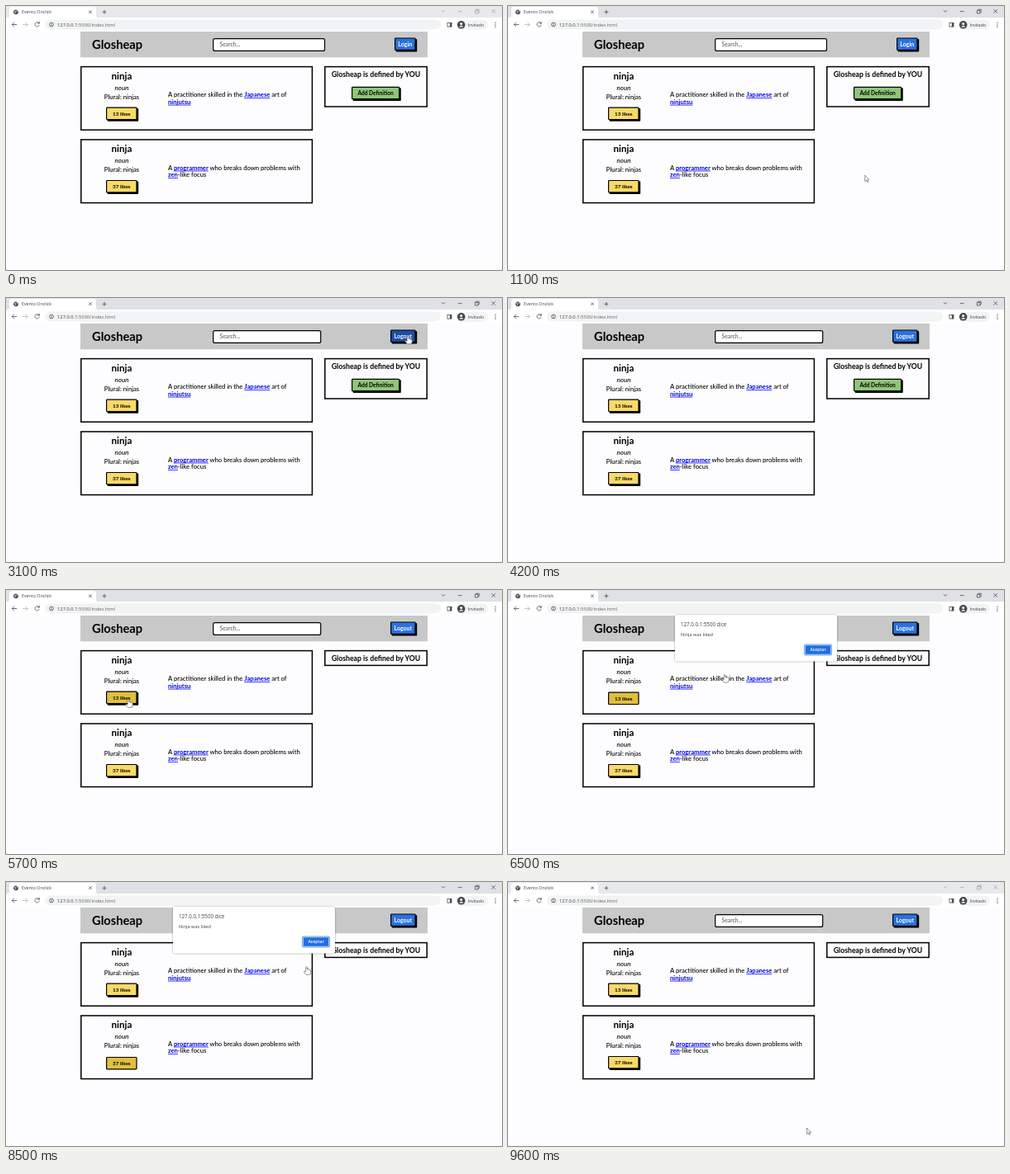
An HTML page for the animation above (9.7 s loop, 600 by 320 pixels).

```html
<!DOCTYPE html>
<html lang="es">
<head>
<meta charset="utf-8">
<style>
  html, body { margin: 0; width: 100%; height: 100%; overflow: hidden; background: #fdfdff; }
  svg { display: block; width: 600px; height: 320px; }
  text { font: 500 7.65px Lato, sans-serif; }
  .bold { font-weight: 700; }
  .mid { text-anchor: middle; }
  .link { fill: #00e; font-weight: 700; text-decoration: underline; }
  .ui { font-family: "Open Sans", sans-serif; fill: #3c4043; }
  .line { fill: none; stroke: #4a4d51; stroke-width: .8; }
  .box { fill: #fdfdff; stroke: #000; stroke-width: 1.5; }
  .face { stroke: #000; stroke-width: 1.2; }
</style>
</head>
<body>
<svg viewBox="0 0 600 320">
  <!-- browser window -->
  <rect id="strip" width="600" height="15"/>
  <path d="M0 15q4 0 4-4V4q0-3 3-3h99q3 0 3 3v7q0 4 4 4z" fill="#fff"/>
  <rect y="14" width="600" height="17" fill="#fff"/>
  <circle cx="12" cy="7.3" r="2.9" fill="#4a4d51"/>
  <path d="M10 6l2 1-1 2M13 5l1 2" stroke="#fff" stroke-width=".7" fill="none"/>
  <text class="ui" x="19" y="9.3" style="font-size:5.3px">Evento Onclick</text>
  <path class="line" d="M100.3 5.5l3.4 3.4m0-3.4l-3.4 3.4M116.5 7.3h5m-2.5-2.5v5"/>
  <path class="line" id="controls" d="M527 5.3l2 2 2-2M547 6.6h4.6M567.4 5.4h3.6v3.6h-3.6zM568.6 5.2V4.2h3.6v3.6h-1M587.5 4.2l4.4 4.4m0-4.4l-4.4 4.4"/>
  <path class="line" d="M13.2 22.5H7.2m2.8-2.8l-2.8 2.8 2.8 2.8M40 20.8a2.7 2.7 0 1 0 .3 2.4M40.4 19v2.2h-2.2"/>
  <path class="line" d="M20.2 22.5h6m-2.8-2.8l2.8 2.8-2.8 2.8" style="stroke:#b0b3b8"/>
  <rect x="47" y="16.5" width="479" height="12" rx="6" fill="#f1f3f4"/>
  <circle class="line" cx="55" cy="22.5" r="2.4"/>
  <path class="line" d="M55 22v1.8M55 20.8v.6"/>
  <text class="ui" x="62" y="24.7" style="font-size:5.8px">127.0.0.1<tspan fill="#5f6368">:5500/index.html</tspan></text>
  <rect class="line" x="534" y="20.3" width="5" height="4.8"/>
  <rect x="536.8" y="20.3" width="2.2" height="4.8" fill="#4a4d51"/>
  <rect x="545" y="16.8" width="38" height="12" rx="6" fill="#f1f3f4"/>
  <circle cx="550.7" cy="22.8" r="4.8" fill="#45484d"/>
  <circle cx="550.7" cy="21.4" r="1.5" fill="#fff"/>
  <path d="M548 25.4q2.7-3.4 5.4 0z" fill="#fff"/>
  <text class="ui" x="558.5" y="24.7" style="font-size:5.2px">Invitado</text>
  <path d="M592 19.8v1.2m0 1.2v1.2m0 1.2v1.2" stroke="#4a4d51" stroke-width="1.1"/>

  <!-- page -->
  <rect x="90" y="31" width="420" height="31.2" fill="#c8c8c8"/>
  <text class="bold" x="104" y="52" style="font-size:14.7px">Glosheap</text>
  <rect id="search" x="250.7" y="39.6" height="14.8" rx="2" fill="#fff" stroke="#000" stroke-width="1.2"/>
  <text x="258.5" y="48.8" fill="#606060" style="font-size:6.8px">Search...</text>
  <rect class="box" id="panel" x="385.8" y="73.6" width="123.4"/>
  <text class="bold mid" x="447.5" y="85.6" style="font-size:8.7px">Glosheap is defined by YOU</text>
  <g id="cards"></g>
  <g id="buttons"></g>

  <!-- alert -->
  <g id="alert">
    <rect x="202" y="30" width="196" height="56.5" rx="2" fill="#fff"
      style="filter:drop-shadow(0 .6px 1.3px #0006)"/>
    <text class="ui" x="209" y="44.2" style="font-size:6.2px">127.0.0.1:5500 dice</text>
    <text class="ui" x="209" y="56.4" style="font-size:5.6px">Ninja was liked</text>
    <rect x="358" y="65.4" width="34" height="14.2" rx="2.4" fill="#6fa3ee"/>
    <rect x="359.4" y="66.8" width="31.2" height="11.4" rx="1.5" fill="#1f70de" stroke="#fff" stroke-width=".6"/>
    <text class="ui mid" x="375" y="74.4" style="font-size:5.1px;font-weight:600;fill:#fff">Aceptar</text>
  </g>

  <!-- pointer, tip at the origin -->
  <g id="pointer" fill="#fff" stroke="#666" stroke-width=".7" stroke-linejoin="round">
    <path id="hand" d="M-.9 .8Q0-.6 .9 .8V3.6Q2 0 2.6 4 3.6 3 4 4.4 5.3 3.8 5.2 5.4V7.4L4.2 9.8H-.6L-3 6.8Q-3.4 5-.9 6.4z"/>
    <path id="arrow" d="M0 0V7.6L1.7 6 3 8.6 4 8.1 2.8 5.6H5z"/>
  </g>
</svg>
<script>
const LOOP = 9700, STEP = 100;
const $ = id => document.getElementById(id);
const show = (el, on) => el.style.display = on ? '' : 'none';

const definitions = [
  ['A practitioner skilled in the <tspan class="link">Japanese</tspan> art of',
   '<tspan class="link">ninjutsu</tspan>'],
  ['A <tspan class="link">programmer</tspan> who breaks down problems with',
   '<tspan class="link">zen</tspan>-like focus'],
];
$('cards').innerHTML = definitions.map(([first, second], i) => `
  <g transform="translate(0 ${i * 88.4})">
    <rect class="box" x="90.8" y="73.6" width="279.6" height="76.6"/>
    <text class="bold mid" x="140" y="89" style="font-size:11.6px">ninja</text>
    <text class="mid" x="140" y="102" style="font-size:8px;font-style:italic">noun</text>
    <text class="mid" x="140" y="112.6">Plural: ninjas</text>
    <text x="196" y="110.2">${first}</text>
    <text x="196" y="118.7">${second}</text>
  </g>`).join('');

function makeButton(label, x, y, w, [fill, hover, ink], size) {
  const g = document.createElementNS('http://www.w3.org/2000/svg', 'g');
  g.innerHTML = `
    <rect x="${x + 1.6}" y="${y + 1.6}" width="${w}" height="15.6" rx="1"/>
    <g><rect class="face" x="${x + .6}" y="${y + .6}" width="${w - 1.2}" height="14.4" rx=".8"/>
    <text class="bold mid" x="${x + w / 2}" y="${y + 10.2}" fill="${ink}" style="font-size:${size}px">${label}</text></g>`;
  $('buttons').append(g);
  const [shadow, body] = g.children;
  return (visible, hovered, pressed) => {
    show(g, visible);
    show(shadow, !pressed);
    body.firstChild.setAttribute('fill', hovered || pressed ? hover : fill);
    body.setAttribute('transform', `translate(0 ${pressed ? 1 : 0})`);
  };
}
const blue = ['#2b72de', '#1b4fa6', '#fff'];
const yellow = ['#f8da68', '#e0c03f', '#000'];
const green = ['#8fc678', '#76ac5f', '#000'];
const login = makeButton('Login', 470, 38.4, 25.6, blue, 7);
const logout = makeButton('Logout', 465, 38.4, 30.6, blue, 7);
const add = makeButton('Add Definition', 418, 97.7, 58.2, green, 6.6);
const like1 = makeButton('13 likes', 121, 122.5, 37.6, yellow, 6.4);
const like2 = makeButton('37 likes', 121, 210.9, 37.6, yellow, 6.4);

// time, x, y of the pointer tip
const path = [
  [100, 400, 279], [1000, 425, 225], [1900, 486, 46], [3600, 486, 46],
  [4400, 452, 106], [4900, 452, 106], [5500, 148, 132.5], [6200, 148, 132.5],
  [6800, 376, 72], [7100, 376, 72], [7300, 286, 114], [7700, 146, 219],
  [8200, 146, 219], [8500, 363.5, 102.5], [8700, 376, 72], [9000, 376, 72],
  [9500, 361.5, 298], [LOOP, 361.5, 298],
];
function pointerAt(t) {
  const i = Math.max(1, path.findIndex(p => p[0] > t));
  const [t0, x0, y0] = path[i - 1], [t1, x1, y1] = path[i];
  const k = Math.max(0, (t - t0) / (t1 - t0));
  return [x0 + (x1 - x0) * k, y0 + (y1 - y0) * k];
}

function draw(t) {
  const during = (from, to) => t >= from && t < to;
  const loggedIn = t >= 3000, added = t >= 4700, focused = during(300, 9300);
  login(!loggedIn, during(1900, 3000), during(2800, 3000));
  logout(loggedIn, during(3000, 3700));
  add(!added, during(4300, 4700), during(4600, 4700));
  like1(true, during(5500, 5900), during(5900, 7200));
  like2(true, during(7700, 7900), during(7900, 9000));
  $('search').setAttribute('width', loggedIn ? 130 : 134.8);
  $('panel').setAttribute('height', added ? 17.8 : 48.4);
  show($('alert'), during(6000, 7100) || during(8000, 8900));
  $('controls').style.stroke = focused ? '' : '#a0a3a8';
  $('strip').setAttribute('fill', focused ? '#dfe1e6' : '#e7e9ed');

  const isHand = during(1900, 9000);
  show($('hand'), isHand);
  show($('arrow'), !isHand);
  show($('pointer'), t >= 100 && !during(4100, 4300));
  $('pointer').setAttribute('transform', `translate(${pointerAt(t)})`);
}

function tick() {
  draw(Math.floor(performance.now() % LOOP / STEP) * STEP);
  requestAnimationFrame(tick);
}
tick();
</script>
</body>
</html>
```
